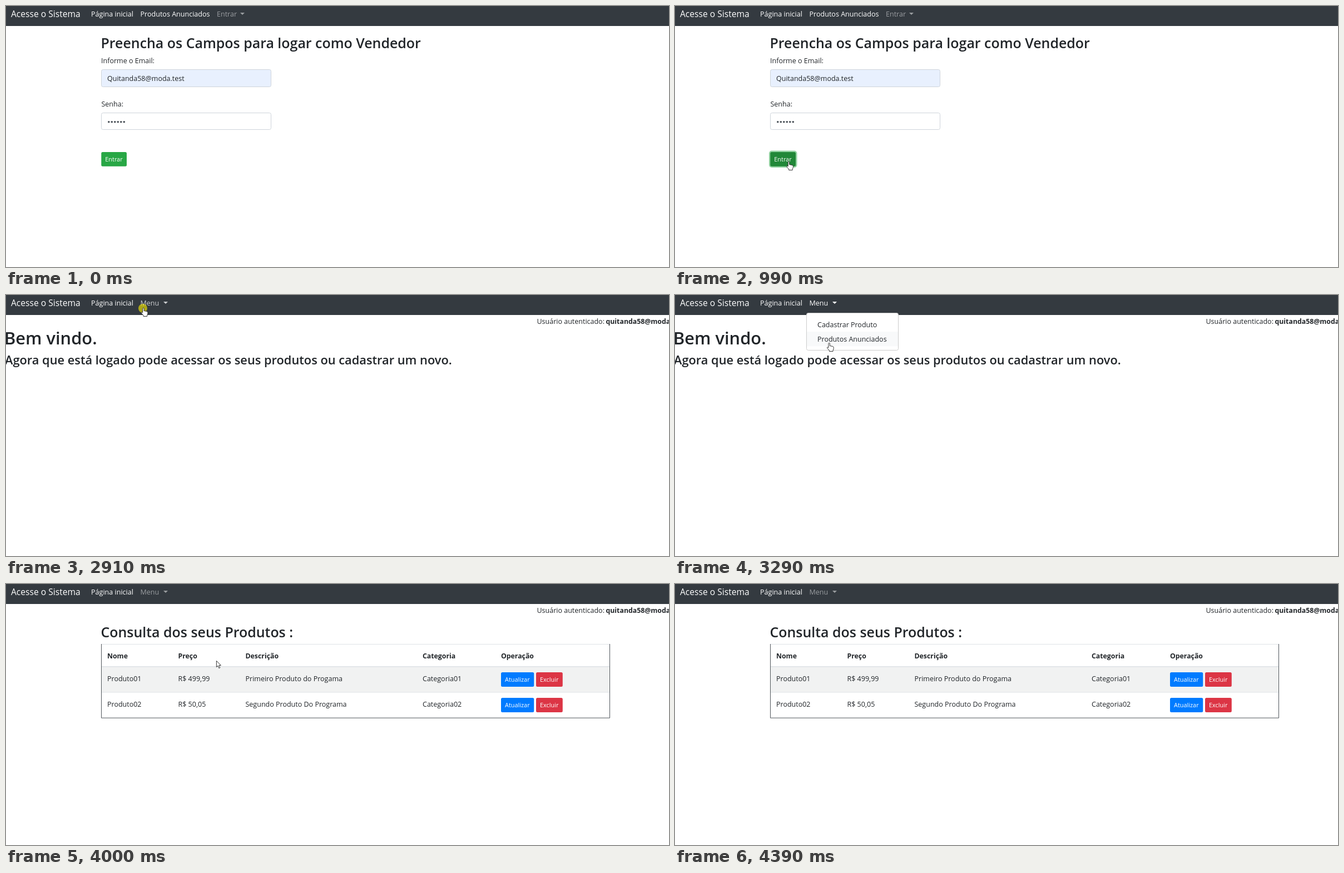
An HTML page that plays this animation: 1192x470 px, repeating every 5.48 s.

```html
<!DOCTYPE html>
<html lang="pt-BR">
<head>
<meta charset="utf-8">
<title>Acesse o Sistema</title>
<style>
html, body { margin: 0; width: 100%; height: 100%; overflow: hidden; background: #fff; }
svg { display: block; width: 1192px; height: 470px; }
text { font: 12.5px "Open Sans", "Noto Sans", sans-serif; fill: #212529; white-space: pre; }
.brand { font-size: 15.6px; fill: #fff; }
.link { font-size: 12.55px; fill: #fff; }
.muted { fill: #9a9da0; }
.h1, .h2, .h3 { font-weight: 600; }
.h1 { font-size: 30.8px; }
.h2 { font-size: 24.95px; }
.h3 { font-size: 21.8px; }
.bold { font-size: 12.3px; font-weight: 700; }
.btn { font-size: 10.9px; fill: #fff; }
.field { stroke: #ced4da; }
</style>
</head>
<body>
<svg viewBox="0 0 1192 470">
  <rect width="1192" height="470" fill="#fff"/>
  <rect width="1192" height="36" fill="#343a40"/>
  <text class="brand" x="9" y="20">Acesse o Sistema</text>
  <text class="link" x="153" y="18.5">Página inicial</text>

  <g id="login">
    <text class="link" x="241.5" y="18.5">Produtos Anunciados</text>
    <text class="link muted" x="379" y="18.5">Entrar</text>
    <path d="M421 12h8l-4 4z" fill="#9a9da0"/>
    <text class="h2" x="170.5" y="76">Preencha os Campos para logar como Vendedor</text>
    <text x="171" y="103">Informe o Email:</text>
    <rect class="field" x="171.5" y="114.5" width="305" height="31" rx="3" fill="#e8f0fe"/>
    <text x="182" y="135.3">Quitanda58@moda.test</text>
    <text x="171.5" y="181">Senha:</text>
    <rect class="field" x="171.5" y="192.5" width="305" height="30" rx="3" fill="#fff"/>
    <g id="dots" fill="#495057"></g>
    <rect id="ring" x="169" y="260.5" width="50.5" height="30.5" rx="5" fill="#94d3a2"/>
    <rect id="enter" x="171.3" y="263" width="45.7" height="25.8" rx="2.5"/>
    <text class="btn" x="178.3" y="280">Entrar</text>
  </g>

  <g id="user">
    <text id="menuText" class="link" x="241.5" y="18.5">Menu</text>
    <path id="caret" d="M283 12h8l-4 4z"/>
    <text x="954.5" y="51.5">Usuário autenticado:</text>
    <text class="bold" x="1078.5" y="51.5">quitanda58@moda.test</text>
  </g>

  <g id="welcome">
    <text class="h1" x="-3" y="89">Bem vindo.</text>
    <text class="h3" x="-2" y="125">Agora que está logado pode acessar os seus produtos ou cadastrar um novo.</text>
  </g>

  <g id="drop">
    <rect x="236.5" y="32.5" width="165" height="67" rx="3" fill="#fff" stroke="#ccc"/>
    <rect id="item" x="237" width="164" height="26.3" fill="#f8f9fa"/>
    <text x="256" y="57.5">Cadastrar Produto</text>
    <text x="256" y="84">Produtos Anunciados</text>
  </g>

  <g id="list">
    <text class="h2" x="170.5" y="95.5">Consulta dos seus Produtos :</text>
    <rect id="row0" x="172" y="149" width="913" height="46"/>
    <rect id="row1" x="172" y="195" width="913" height="46"/>
    <path d="M172 108.5H1085M172 195H1085" stroke="#dee2e6"/>
    <path d="M172 148.7H1085" stroke="#dee2e6" stroke-width="1.6"/>
    <path d="M171.5 108V241.2H1085.5V108" fill="none" stroke="#50565b"/>
    <g id="cells"></g>
  </g>

  <circle id="press" r="8" fill="#fff000" fill-opacity=".6"/>
  <g id="cursor" fill="#fff" stroke="#222" stroke-width=".9" stroke-linejoin="round">
    <path id="arrow" d="M.4 .4V11.6L3 9.2 4.9 13.6 6.8 12.8 5 8.5H8.4Z"/>
    <path id="hand" d="M-1.3 8V1a1.2 1.2 0 0 1 2.4 0V5l5 1q1.8.4 1.8 2V10l-1.2 3.5V15H.2V13.5L-3.6 9q-.6-1.4.6-1.6.8 0 1.7 1Z"/>
    <path id="beam" d="M-2-5H-.6L0-4.4.6-5H2M0-4.4V4.4M-2 5H-.6L0 4.4.6 5H2" fill="none" stroke="#555"/>
  </g>
</svg>
<script>
const LOOP = 5480;
const el = {};
document.querySelectorAll('[id]').forEach(e => el[e.id] = e);

const label = (x, y, s, cls = '') => `<text class="${cls}" x="${x}" y="${y}">${s}</text>`;
const button = (x, y, w, fill, s) =>
  `<rect x="${x}" y="${y}" width="${w}" height="26" rx="2.5" fill="${fill}"/>` + label(x + 7, y + 17, s, 'btn');

const columns = [182, 309.5, 430.5, 749, 890];
const rows = [
  ['Nome', 'Preço', 'Descrição', 'Categoria', 'Operação'],
  ['Produto01', 'R$ 499,99', 'Primeiro Produto do Progama', 'Categoria01'],
  ['Produto02', 'R$ 50,05', 'Segundo Produto Do Programa', 'Categoria02']
];
el.cells.innerHTML = rows.map((row, r) => {
  const y = r ? 128.5 + 46 * r : 133.5;
  const cells = row.map((s, c) => label(columns[c], y, s, r ? '' : 'bold')).join('');
  if (!r) return cells;
  const top = 113 + 46 * r;
  return cells + button(890, top, 59.3, '#007bff', 'Atualizar') + button(953, top, 47.8, '#dc3545', 'Excluir');
}).join('');

for (let i = 0; i < 6; i++)
  el.dots.innerHTML += `<circle cx="${184.8 + i * 5.5}" cy="208.8" r="1.8"/>`;

// Pointer legs: start, ms per step, steps, from x/y, to x/y
const legs = [
  [210, 77, 8, 601, 403, 204.5, 280.5],
  [2310, 72.5, 5, 211, 245, 247, 23.5],
  [2990, 75, 5, 249, 36, 277.3, 86.5],
  [4000, 70, 5, 378, 138, 666, 431]
];

function pointer(t) {
  const leg = legs.filter(l => t >= l[0]).pop();
  if (!leg || t >= 4390) return null;
  const [start, step, n, x0, y0, x1, y1] = leg;
  const p = Math.min(n - 1, Math.floor((t - start) / step)) / (n - 1);
  return { x: x0 + (x1 - x0) * (1 - (1 - p) ** 2), y: y0 + (y1 - y0) * p };
}

const show = (e, on) => e.setAttribute('display', on ? 'inline' : 'none');
const fill = (e, c) => e.style.fill = c;

function draw(t) {
  const within = (a, b) => t >= a && t < b;
  const pos = pointer(t);

  show(el.login, t < 1910);
  show(el.user, t >= 1910);
  show(el.welcome, within(1910, 3690));
  show(el.list, t >= 3690);
  show(el.drop, within(2990, 3520));

  fill(el.enter, t < 749 ? '#28a745' : '#218838');
  show(el.ring, t >= 830);

  const tone = within(2990, 3520) ? '#fff' : within(2600, 2990) ? '#ccced0' : '#9a9da0';
  fill(el.menuText, tone);
  fill(el.caret, tone);

  const tipY = pos ? pos.y : -1;
  show(el.item, tipY > 40);
  el.item.setAttribute('y', tipY < 66 ? 39.7 : 66);
  const over = y => t >= 4000 && tipY >= y && tipY < y + 46;
  fill(el.row0, over(149) ? '#ececec' : '#f1f2f2');
  fill(el.row1, over(195) ? '#ececec' : '#fff');

  show(el.cursor, pos);
  show(el.press, within(830, 990) || within(2760, 2990) || within(3370, 3520));
  if (!pos) return;
  const hand = within(749, 2310) || within(2600, 3520);
  const beam = within(4070, 4140);
  show(el.hand, hand);
  show(el.beam, beam);
  show(el.arrow, !hand && !beam);
  el.cursor.setAttribute('transform', `translate(${pos.x} ${pos.y})`);
  el.press.setAttribute('cx', pos.x - 1);
  el.press.setAttribute('cy', pos.y + .5);
}

const begin = performance.now();
function tick() {
  draw((performance.now() - begin) % LOOP);
  requestAnimationFrame(tick);
}
tick();
</script>
</body>
</html>
```
